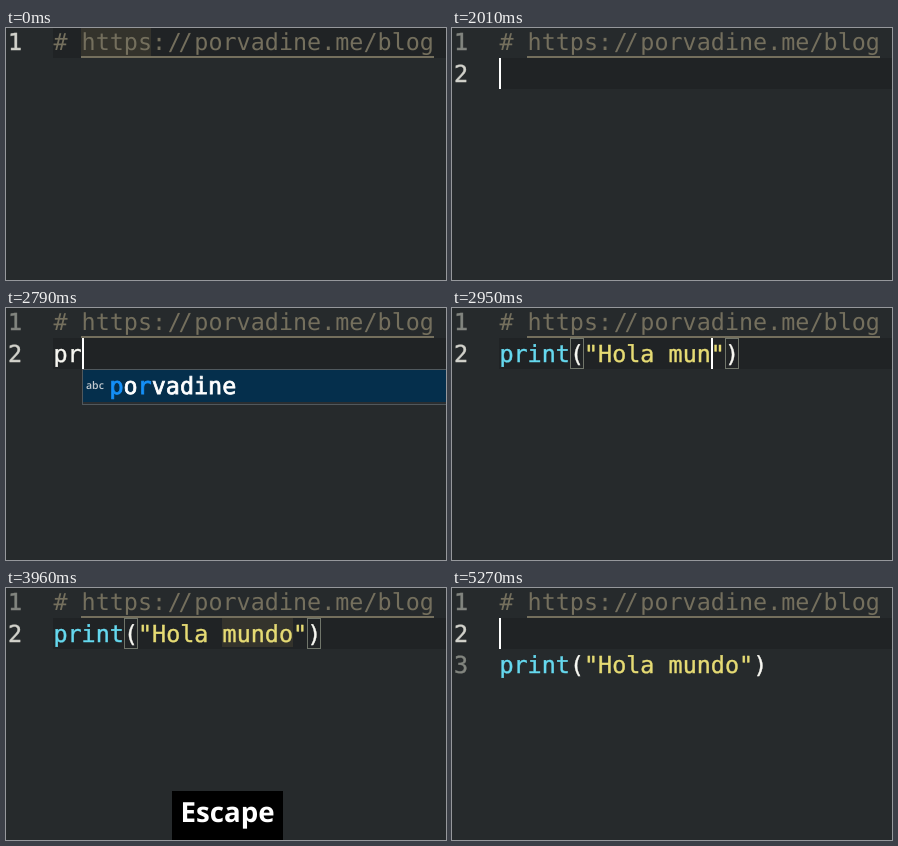
These frames come from a looping animation (440 px wide and 252 px high, 5.66 s). An HTML page:

```html
<!DOCTYPE html>
<html lang="es">
<head>
<meta charset="utf-8">
<title>Editor</title>
<style>
html, body { margin: 0; width: 100%; height: 100%; overflow: hidden; background: #262a2c; }
svg { display: block; width: 440px; height: 252px; }
text { font: 23.42px "DejaVu Sans Mono", monospace; text-rendering: geometricPrecision; }
.solid { stroke-width: 0.4; }
.heavy { stroke-width: 0.8; }
.key { font-family: "Open Sans", sans-serif; font-weight: 700; }
.tag { font: 600 10.5px "Open Sans", sans-serif; }
</style>
</head>
<body>
<svg id="stage" viewBox="0 0 440 252"></svg>
<script>
const LOOP = 5660, LEFT = 47.4, CELL = 14.1, ROW = 31;
const C = {
  line: "#202325", word: "#34332c", comment: "#746f5d", num: "#82857f", numOn: "#d2d2cb",
  call: "#66d9ef", str: "#e6db74", strDim: "#c9c06a", plain: "#f8f8f2", white: "#ffffff",
  popup: "#052f4c", popupEnd: "#2a2e31", edge: "#50585d", hit: "#1590f8", bracket: "#70756a"
};
const HOST = "porvadine";

const KEYS = {
  o: { text: "o", x: 203, y: 212, w: 36, base: 239.8, size: 29.5 },
  esc: { text: "Escape", x: 166, y: 203, w: 111, base: 234.3, size: 27.7 },
  open: { text: "Shift + O", x: 148, y: 208, w: 145, base: 240.5, size: 30 }
};

// Each step changes only the listed properties of the step before it.
const STEPS = [
  [0, { row: 0, lines: 1, code: "", codeRow: 1, url: true }],
  [160, { block: 4 }],
  [700, { block: null }],
  [930, { key: "o" }],
  [2010, { key: null, row: 1, lines: 2, url: false, bar: 0 }],
  [2480, { code: "p", bar: 1 }],
  [2550, { popup: "empty" }],
  [2630, { popup: "full" }],
  [2790, { code: "pr", bar: 2 }],
  [2870, { code: 'print("Hola")', bar: 11, popup: null, match: true }],
  [2950, { code: 'print("Hola mun")', bar: 15 }],
  [3100, { code: 'print("Hola mund")', bar: 16 }],
  [3180, { code: 'print("Hola mundo")', bar: 17 }],
  [3420, { bar: null, block: 16, key: "esc" }],
  [3490, { word: true, dim: true }],
  [3650, { dim: false }],
  [3960, { block: null }],
  [4190, { word: false, bar: 0, lines: 3, codeRow: 2, key: "open" }],
  [5270, { key: null, match: false }]
];

const col = n => LEFT + n * CELL;
const rowTop = r => r * ROW - 1;
const base = r => Math.round(22.3 + r * 31.3);
const rect = (x, y, w, h, fill, more = "") =>
  `<rect x="${x}" y="${y}" width="${w}" height="${h}" fill="${fill}" ${more}/>`;
const text = (x, y, s, fill, more = "") =>
  `<text x="${x}" y="${y}" fill="${fill}" ${more}>${s}</text>`;
const solid = (x, y, s, fill, cls = "solid") =>
  text(x, y, s, fill, `stroke="${fill}" class="${cls}"`);

function header(s) {
  let out = s.url ? rect(75, 0, 70, 28, C.word) : "";
  out += text(col(0), base(0), "#", C.comment);
  out += text(col(2), base(0),
    `https:<tspan dx="1.7">/</tspan><tspan dx="-3.4">/</tspan><tspan dx="1.7">${HOST}.me/blog</tspan>`, C.comment);
  return out + rect(75, 28, 353, 2, C.comment);
}

function bracket(n, r) {
  return rect(Math.round(col(n)) + 0.5, rowTop(r) + 0.5, 13, 30, "none", `stroke="${C.bracket}"`);
}

function codeLine(s) {
  const r = s.codeRow, y = base(r), code = s.code, end = code.length - 1;
  if (!code.includes("(")) return solid(col(0), y, code, C.plain);
  let out = s.word ? rect(216, rowTop(r), 71, ROW - 2, C.word) : "";
  if (s.match) out += bracket(5, r) + bracket(end, r);
  out += solid(col(0), y, "print", C.call) + solid(col(5), y, "(", C.plain);
  out += solid(col(6), y, code.slice(6, 12), C.str);
  if (end > 12) {
    const cut = Math.min(16, end);
    out += solid(col(12), y, code.slice(12, cut), s.dim ? C.strDim : C.str);
    out += solid(col(cut), y, code.slice(cut, end), C.str);
  }
  return out + solid(col(end), y, ")", C.plain);
}

function popup(s) {
  const x = Math.round(col(s.bar));
  let out = rect(x + 0.5, 61.5, 450, 35, C.popup, `stroke="${C.edge}"`) +
    rect(x + 1, 94, 450, 2, C.popupEnd);
  if (s.popup === "empty") return out;
  out += text(x + 4, 81, "abc", "#c4cbd0", 'class="tag"');
  const hits = s.code.length > 1 ? [0, 2] : [0];
  [...HOST].forEach((ch, i) => {
    out += solid(x + 27.4 + i * CELL, 86, ch, hits.includes(i) ? C.hit : C.white, "heavy");
  });
  return out;
}

function blockCursor(s) {
  const r = s.row, y = Math.max(0, rowTop(r));
  const ch = r ? s.code[s.block] : "t";
  return rect(col(s.block), y, CELL, rowTop(r + 1) - y, C.white) +
    solid(col(s.block), base(r), ch, C.line);
}

function badge(k) {
  return rect(k.x, k.y, k.w, 252 - k.y, "#000") +
    text(k.x + k.w / 2, k.base, k.text, C.white,
      `class="key" text-anchor="middle" style="font-size:${k.size}px"`);
}

function scene(s) {
  let out = rect(0, 0, 440, 252, "#262a2c") + rect(47, rowTop(s.row), 393, ROW, C.line);
  for (let i = 0; i < s.lines; i++)
    out += solid(2, base(i), i + 1, i === s.row ? C.numOn : C.num);
  out += header(s);
  if (s.code) out += codeLine(s);
  if (s.bar != null) out += rect(Math.round(col(s.bar)), rowTop(s.row), 2, ROW, C.white);
  if (s.block != null) out += blockCursor(s);
  if (s.popup) out += popup(s);
  if (s.key) out += badge(KEYS[s.key]);
  return out;
}

const stage = document.getElementById("stage");
let shown = -1;

function draw(now) {
  const t = now % LOOP;
  const n = STEPS.filter(step => step[0] <= t).length;
  if (n !== shown) {
    shown = n;
    stage.innerHTML = scene(Object.assign({}, ...STEPS.slice(0, n).map(step => step[1])));
  }
}

const start = performance.now();
function tick() {
  draw(performance.now() - start);
  requestAnimationFrame(tick);
}
tick();
</script>
</body>
</html>
```
